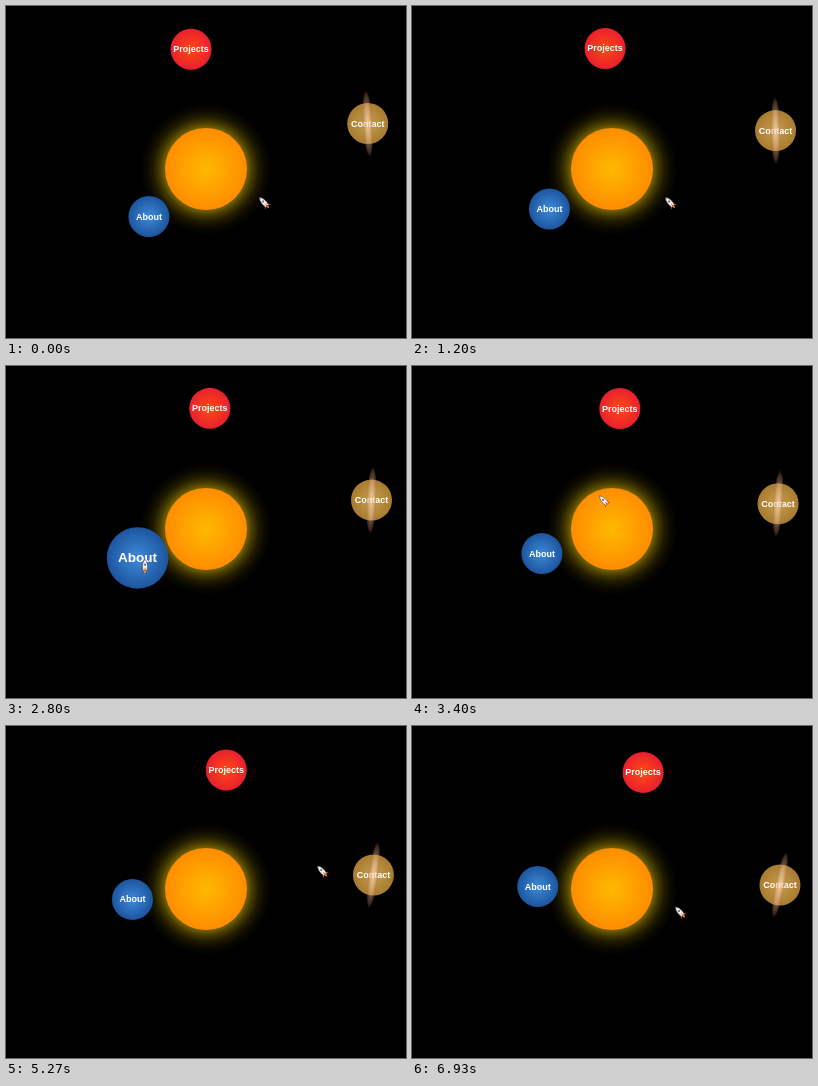
An HTML page that plays this animation: 400 by 332 pixels, repeating every 7000 ms.

```html
<!DOCTYPE html>
<html lang="en">
<head>
<meta charset="utf-8">
<title>Orbit menu</title>
<style>
  html, body { margin: 0; width: 100%; height: 100%; overflow: hidden; background: #000; }
  svg { display: block; width: 400px; height: 332px; }
  text { font: bold 9px "Liberation Sans", Arial, sans-serif; fill: #fff; text-anchor: middle; }
</style>
</head>
<body>
<svg viewBox="0 0 400 332">
  <defs>
    <radialGradient id="glow">
      <stop offset=".6" stop-color="#ffd700" stop-opacity=".5"/>
      <stop offset=".7" stop-color="#ffd700" stop-opacity=".28"/>
      <stop offset=".8" stop-color="#ffd700" stop-opacity=".12"/>
      <stop offset=".9" stop-color="#ffd700" stop-opacity=".04"/>
      <stop offset="1" stop-color="#ffd700" stop-opacity="0"/>
    </radialGradient>
    <radialGradient id="sun">
      <stop offset="0" stop-color="#ffb900"/>
      <stop offset="1" stop-color="#ff8c00"/>
    </radialGradient>
    <radialGradient id="red">
      <stop offset="0" stop-color="#ff4a12"/>
      <stop offset="1" stop-color="#e8202f"/>
    </radialGradient>
    <radialGradient id="blue">
      <stop offset="0" stop-color="#3f8ad8"/>
      <stop offset="1" stop-color="#1c559f"/>
    </radialGradient>
    <radialGradient id="gold">
      <stop offset="0" stop-color="#c69c4c"/>
      <stop offset="1" stop-color="#a87c30"/>
    </radialGradient>
    <radialGradient id="ringFill">
      <stop offset="0" stop-color="#ffe9cd" stop-opacity=".65"/>
      <stop offset=".55" stop-color="#e6b48c" stop-opacity=".5"/>
      <stop offset=".85" stop-color="#b47a5c" stop-opacity=".35"/>
      <stop offset="1" stop-color="#966048" stop-opacity="0"/>
    </radialGradient>
  </defs>
  <rect width="400" height="332"/>
  <circle cx="200" cy="163" r="66" fill="url(#glow)"/>
  <circle cx="200" cy="163" r="41" fill="url(#sun)"/>
  <g id="planets"></g>
  <g id="rocket">
    <path d="M-2 3 L-4.2 6.5 L-1.5 5.5 Z M2 3 L4.2 6.5 L1.5 5.5 Z" fill="#e2491f"/>
    <path d="M-1.5 5 L0 8.5 L1.5 5 Z" fill="#ffa51f"/>
    <path d="M0 -7.5 C3 -4 3.2 1 2 5 H-2 C-3.2 1 -3 -4 0 -7.5 Z" fill="#f2f0ee" stroke="#4b4444" stroke-width=".6"/>
    <circle cy="-1.5" r="1.2" fill="#62707c"/>
    <path d="M0 2 V5.5" stroke="#d8432a"/>
  </g>
</svg>
<script>
const LOOP = 7000, GROW = 300, SUN = { x: 200, y: 163 };

// Angles in degrees, clockwise from the right; speed in degrees per second.
const planets = [
  { name: 'About', fill: 'blue', orbit: 74.3, angle: 140.2, speed: 6.02, hover: [2060, 3070] },
  { name: 'Projects', fill: 'red', orbit: 120.7, angle: -97.1, speed: 3.18, hover: [3740, 4640] },
  { name: 'Contact', fill: 'gold', orbit: 168, angle: -15.7, speed: 2.07, hover: [5560, 6380], ring: true }
];

// Pointer path: time, x, y
const path = [
  [0, 258, 196.5], [1600, 258, 196.5], [2180, 139, 200], [2950, 139, 200],
  [3400, 192, 135], [3850, 214, 45], [4550, 214, 45], [5270, 316, 145],
  [5700, 360, 152], [6300, 360, 152], [6930, 268, 186], [7000, 264, 189]
];

const rocket = document.getElementById('rocket');
const layer = document.getElementById('planets');

function add(parent, tag, attrs) {
  const node = document.createElementNS('http://www.w3.org/2000/svg', tag);
  for (const key in attrs) node.setAttribute(key, attrs[key]);
  return parent.appendChild(node);
}

for (const p of planets) {
  p.node = add(layer, 'g', {});
  add(p.node, 'circle', { r: 20.5, fill: `url(#${p.fill})` });
  add(p.node, 'text', { y: 3 }).textContent = p.name;
  if (p.ring) p.ringNode = add(p.node, 'ellipse', { rx: 5.2, ry: 34, fill: 'url(#ringFill)' });
}

function easeSince(start, t) {
  const k = Math.min(1, Math.max(0, (t - start) / GROW));
  return 1 - (1 - k) ** 2.4;
}

function pointerAt(t) {
  const i = path.findIndex(point => point[0] > t);
  const [t0, x0, y0] = path[i - 1], [t1, x1, y1] = path[i];
  const k = (t - t0) / (t1 - t0);
  return [x0 + (x1 - x0) * k, y0 + (y1 - y0) * k];
}

function render(t) {
  let hovering = false;
  for (const p of planets) {
    const [enter, leave] = p.hover;
    const angle = p.angle + p.speed * t / 1000;
    const rad = angle * Math.PI / 180;
    const x = SUN.x + p.orbit * Math.cos(rad);
    const y = SUN.y + p.orbit * Math.sin(rad);
    const scale = 1 + 0.5 * (easeSince(enter, t) - easeSince(leave, t));
    p.node.setAttribute('transform', `translate(${x} ${y}) scale(${scale})`);
    if (p.ringNode) p.ringNode.setAttribute('transform', `rotate(${angle + 12.4})`);
    hovering = hovering || (t >= enter && t < leave);
  }
  const [x, y] = pointerAt(t);
  rocket.setAttribute('transform', `translate(${x} ${y}) rotate(${hovering ? 0 : -42}) scale(.9)`);
}

const start = performance.now();
function tick() {
  render((performance.now() - start) % LOOP);
  requestAnimationFrame(tick);
}
tick();
</script>
</body>
</html>
```
